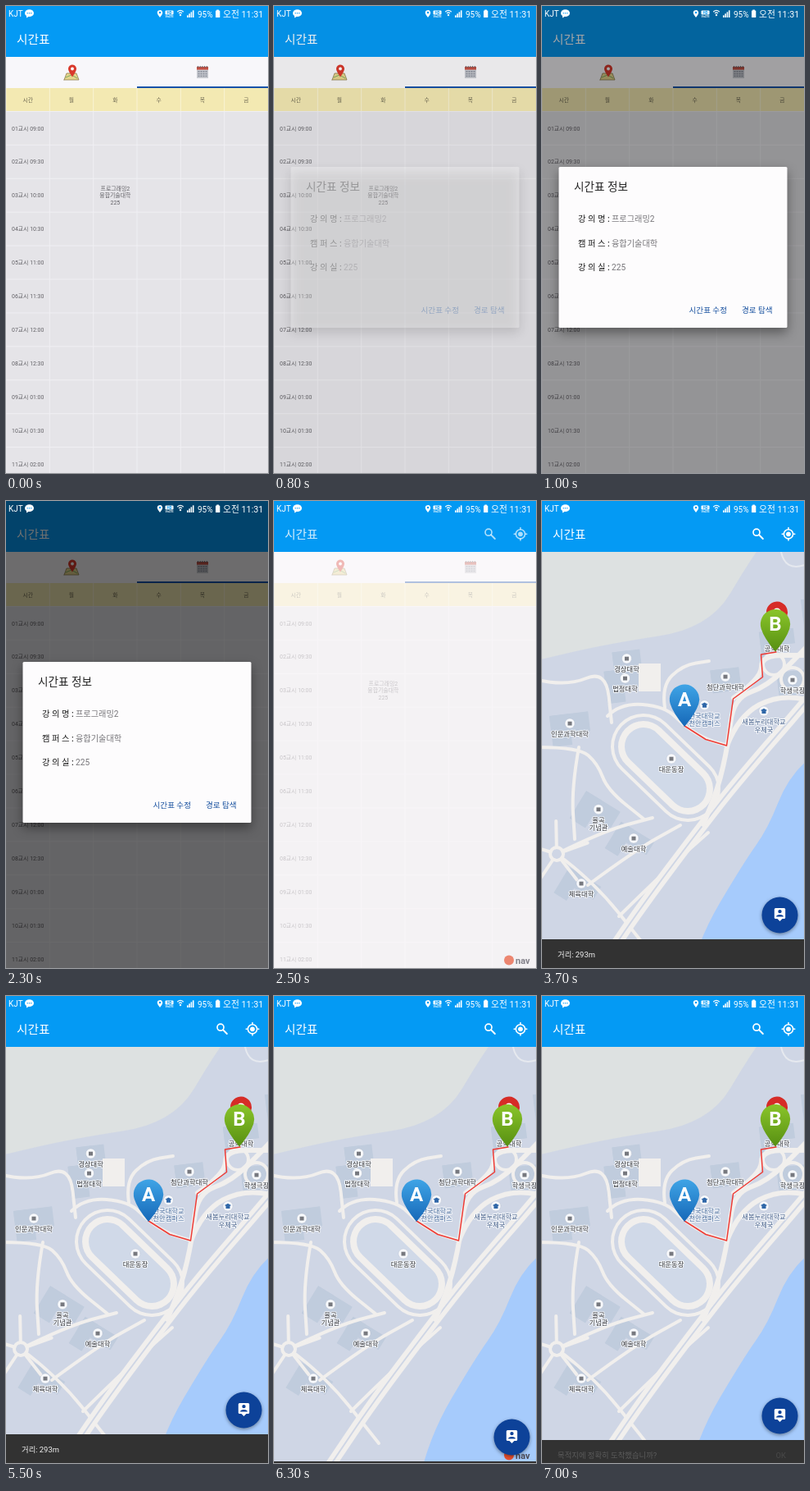
An HTML page with a canvas that plays this animation: 320 px wide and 569 px high, repeating every 7100 ms.

```html
<!DOCTYPE html>
<html lang="ko">
<head>
<meta charset="utf-8">
<title>시간표</title>
<style>
html, body { margin: 0; width: 100%; height: 100%; overflow: hidden; background: #fff; }
canvas { display: block; width: 100%; height: 100%; }
</style>
</head>
<body>
<canvas id="stage"></canvas>
<script>
const W = 320, H = 569, LOOP = 7100, STEP = 100, BAR = 62;
const FONT = 'Roboto, "Noto Sans CJK KR", "Noto Sans CJK", sans-serif';
const BLUE = '#049af4', ACCENT = '#0d4299', WHITE = '#fff', INK = '#37383d';
const LAND = '#cfd6e5', ROAD = '#f1efed', BLOCK = '#c0ccdd';
const dpr = Math.max(1, window.devicePixelRatio || 1);

// ---- helpers ----
function sheet(canvas, w, h) {
  canvas.width = w * dpr;
  canvas.height = h * dpr;
  const ctx = canvas.getContext('2d');
  ctx.scale(dpr, dpr);
  return ctx;
}

let c = sheet(document.getElementById('stage'), W, H);

function rect(x, y, w, h, fill) { c.fillStyle = fill; c.fillRect(x, y, w, h); }

function round(x, y, w, h, r, fill) {
  c.beginPath(); c.roundRect(x, y, w, h, r);
  c.fillStyle = fill; c.fill();
}

function disc(x, y, r, fill) {
  c.beginPath(); c.arc(x, y, r, 0, 7);
  c.fillStyle = fill; c.fill();
}

function ring(x, y, r, color, width) {
  c.beginPath(); c.arc(x, y, r, 0, 7);
  c.strokeStyle = color; c.lineWidth = width; c.stroke();
}

// y is the middle of the line of text
function text(s, x, y, size, color, align = 'left', weight = 400, halo) {
  c.font = `${weight} ${size}px ${FONT}`;
  c.textAlign = align;
  const base = y + size * 0.37;
  if (halo) {
    c.strokeStyle = halo; c.lineWidth = 2; c.lineJoin = 'round';
    c.strokeText(s, x, base);
  }
  c.fillStyle = color;
  c.fillText(s, x, base);
}

// rounds the corners of a list of points
function trace(p, smooth) {
  c.beginPath();
  c.moveTo(p[0], p[1]);
  for (let i = 2; i < p.length; i += 2) {
    if (smooth && i < p.length - 2)
      c.quadraticCurveTo(p[i], p[i + 1], (p[i] + p[i + 2]) / 2, (p[i + 1] + p[i + 3]) / 2);
    else c.lineTo(p[i], p[i + 1]);
  }
}

function area(p, fill, smooth) {
  trace(p, smooth); c.closePath();
  c.fillStyle = fill; c.fill();
}

function line(p, width, color, smooth) {
  trace(p, smooth);
  c.lineWidth = width; c.strokeStyle = color;
  c.lineCap = c.lineJoin = 'round';
  c.stroke();
}

function faded(alpha, draw) {
  if (alpha <= 0) return;
  c.save(); c.globalAlpha *= alpha; draw(); c.restore();
}

function shadowed(blur, drop, draw) {
  c.save();
  c.shadowColor = 'rgba(0,0,0,.4)';
  c.shadowBlur = blur * dpr;
  c.shadowOffsetY = drop * dpr;
  draw();
  c.restore();
}

const ramp = (t, from, span) => Math.min(1, Math.max(0, (t - from) / span));
const ease = (t, from, span) => { const u = ramp(t, from, span); return u * u * (3 - 2 * u); };

function random(seed) {
  return () => (seed = seed * 16807 % 2147483647) / 2147483647;
}

// ---- chrome ----
function statusBar() {
  text('KJT', 3, 9.5, 10, WHITE);
  c.beginPath(); c.ellipse(28.5, 8.7, 5.5, 4.4, 0, 0, 7); c.fillStyle = WHITE; c.fill();
  area([25, 11, 25, 14.5, 29, 12], WHITE);
  for (let i = 0; i < 3; i++) disc(26.2 + i * 2.3, 8.7, 0.7, BLUE);
  pinShape(188, 5, 3.2, 14, WHITE);
  disc(188, 8, 1.2, BLUE);
  round(194.5, 5.5, 10, 5, 1, WHITE);
  text('HD', 199.5, 8, 4.5, BLUE, 'center', 700);
  text('VoLTE', 199.5, 12.6, 3.6, WHITE, 'center', 700);
  for (const r of [2.5, 5]) {
    c.beginPath(); c.arc(213, 10.5, r, -2.3, -0.85);
    c.lineWidth = 1.2; c.strokeStyle = WHITE; c.stroke();
  }
  disc(213, 11, 1.2, WHITE);
  for (let i = 0; i < 4; i++) rect(221 + i * 2.3, 11.3 - i * 2, 1.6, 2.7 + i * 2, WHITE);
  text('95%', 234, 9.8, 10, WHITE);
  rect(257.3, 4.5, 2.6, 1.5, WHITE);
  round(256, 5.5, 5.3, 8.5, 0.6, WHITE);
  text('오전 11:31', 265, 9.8, 10.8, WHITE);
}

function appBar(icons) {
  rect(0, 0, W, BAR, BLUE);
  text('시간표', 13, 40.5, 14.7, WHITE);
  if (!icons) return;
  ring(262, 38.2, 4, WHITE, 1.7);
  line([265.2, 41.4, 269.8, 46], 2, WHITE);
  ring(301, 40.3, 5.6, WHITE, 1.6);
  disc(301, 40.3, 2.9, WHITE);
  for (let i = 0; i < 4; i++) {
    const x = Math.cos(i * Math.PI / 2), y = Math.sin(i * Math.PI / 2);
    line([301 + x * 6, 40.3 + y * 6, 301 + x * 7.8, 40.3 + y * 7.8], 1.5, WHITE);
  }
}

function pinShape(x, top, r, tip, fill) {
  const y = top + r;
  c.beginPath();
  c.arc(x, y, r, Math.PI * 0.9, Math.PI * 0.1);
  c.quadraticCurveTo(x + r * 0.75, y + r * 0.95, x, tip);
  c.quadraticCurveTo(x - r * 0.75, y + r * 0.95, x - r * 0.95, y + r * 0.31);
  c.fillStyle = fill; c.fill();
}

// ---- timetable ----
function tabs() {
  rect(0, BAR, W, 38, '#f8f7fa');
  const sheetEdge = [71, 90, 74, 82, 86, 82, 89, 90, 71, 90];
  area(sheetEdge, '#e6d58d');
  line(sheetEdge, 0.8, '#8d7d4d');
  line([73, 87, 80, 84, 87, 88], 1, '#7fae62');
  pinShape(81, 71.5, 5, 86.5, '#d9392c');
  disc(81, 76.5, 1.9, WHITE);
  rect(233, 74, 14, 14, '#c9cbd1');
  rect(233, 74, 14, 3.6, '#c84d3f');
  for (let i = 0; i < 5; i++) rect(234 + i * 2.7, 73, 1, 2.5, '#666a72');
  for (let i = 0; i < 12; i++)
    rect(234.5 + i % 4 * 3, 79 + Math.floor(i / 4) * 2.8, 2, 1.6, '#878c98');
  rect(160, 98, 160, 2, '#1752a8');
}

function timetable() {
  const col = W / 6, row = 40.9, top = 128.5, ink = '#626166';
  const two = n => String(n).padStart(2, '0');
  appBar(false);
  rect(0, BAR, W, H, '#e5e4e8');
  tabs();
  rect(0, 100, W, 28.5, '#f3e9b2');
  ['시간', '월', '화', '수', '목', '금'].forEach((s, i) => {
    text(s, col * (i + 0.5), 114.3, 6.8, '#6b6650', 'center');
    rect(col * i - 0.5, 100, 1, 28.5, '#faf4d4');
    rect(col * i - 0.5, top, 1, H, '#f0eff3');
  });
  for (let i = 0; i < 11; i++) {
    rect(0, top + i * row - 0.5, W, 1, '#f0eff3');
    const min = 540 + i * 30, hour = Math.floor(min / 60);
    const clock = two((hour - 1) % 12 + 1) + ':' + two(min % 60);
    text(`${two(i + 1)}교시 ${clock}`, col / 2, 149 + i * row, 6.9, ink, 'center');
  }
  ['프로그래밍2', '융합기술대학', '225'].forEach((s, i) =>
    text(s, col * 2.5, 222.3 + i * 8.4, 6.9, ink, 'center'));
}

function dialog() {
  shadowed(14, 6, () => round(20.5, 196, 279, 196, 1.5, '#fdfcfd'));
  text('시간표 정보', 39, 219.5, 13.6, '#222');
  [['강 의 명 :', '프로그래밍2'], ['캠 퍼 스 :', '융합기술대학'], ['강 의 실 :', '225']].forEach(([k, v], i) => {
    const y = 259.3 + i * 29.6;
    text(k, 44, y, 10.3, '#1c1c1c', 'left', 500);
    text(v, 85, y, 10.2, '#77767a');
  });
  text('시간표 수정', 179.5, 370.5, 9.6, '#17509f', 'left', 500);
  text('경로 탐색', 244, 370.5, 9.6, '#17509f', 'left', 500);
}

// ---- map ----
const PLACES = [
  ['경상대학', 103.5, 205], ['법정대학', 101.5, 229], ['인문과학대학', 34, 284],
  ['율곡|기념관', 69, 388.7], ['예술대학', 112, 424], ['체육대학', 48, 479],
  ['첨단과학대학', 224, 227], ['학생극장', 306, 231], ['공학대학', 287, 179.5],
  ['생명자원|과학대학', 340, 141.5]
];

function place(s, x, y, color = INK) {
  disc(x, y - 13, 6, 'rgba(250,251,253,.95)');
  ring(x, y - 13, 6, 'rgba(150,160,180,.35)', 0.6);
  if (color === INK) rect(x - 2.5, y - 15.3, 5, 4.8, '#77797f');
  else {
    area([x - 4, y - 14, x, y - 16.3, x + 4, y - 14, x, y - 11.8], '#2f67a8');
    rect(x - 2.5, y - 13, 5, 3, '#2f67a8');
  }
  s.split('|').forEach((part, i) =>
    text(part, x, y + i * 9.5, 8.3, color, 'center', 500, 'rgba(247,249,252,.9)'));
}

// an L-shaped block beside every named place
function buildings() {
  const rnd = random(41);
  for (const [, x, y] of PLACES) {
    const w = 34 + rnd() * 16, h = 16 + rnd() * 8;
    c.save();
    c.translate(x, y - 13);
    c.rotate(y > 340 ? 0.55 : -0.12);
    rect(-w / 2, -h / 2, w, h, BLOCK);
    rect(-w / 2, -h / 2, h, w * 0.8, BLOCK);
    c.restore();
  }
}

function campusLanes() {
  const lane = (...p) => line(p, 4, ROAD, true);
  // oblique grid south of the track
  for (let i = 0; i < 3; i++)
    lane(18 + i * 38, 430 + i * 38, 75 + i * 38, 402 + i * 24, 135 + i * 34, 386 + i * 9);
  lane(18, 430, 62, 462, 128, 545);
  for (let a = 0.3; a < 6; a += 1.25)
    lane(18, 430, 18 - 40 * Math.cos(a), 430 - 40 * Math.sin(a));
  disc(18, 430, 6, LAND);
  ring(18, 430, 8, ROAD, 4);
  // west and north edge
  lane(-5, 300, 45, 300, 68, 320, 80, 352, 125, 388);
  lane(45, 300, 36, 350, 40, 412);
  lane(-5, 218, 30, 226, 78, 206, 85, 270);
  lane(80, 262, 96, 246, 150, 250, 176, 276, 202, 291, 227, 298);
  lane(150, 252, 146, 225, 172, 200, 204, 195);
  rect(118, 198, 27, 34, ROAD);
}

function track() {
  const lap = [124, 299, 178, 351];
  [[80, ROAD], [72, LAND], [62, ROAD], [46, '#d0d9e8']].forEach(([w, fill]) => line(lap, w, fill));
}

function streets() {
  const avenue = [450, 92, 330, 236, 241, 338, 193, 399, 120, 496, 70, 570];
  line(avenue, 13, ROAD, true);
  line(avenue, 2, LAND, true);
  const street = (...p) => line(p, 6, ROAD, true);
  street(450, 42, 370, 126, 318, 184, 275, 226, 234, 240, 227, 298, 215, 350, 197, 394);
  street(226, 298, 240, 262, 290, 235, 352, 248, 420, 244);
  street(234, 240, 268, 216, 268, 188, 320, 188);
  for (const [x, y, r] of [[283, 199, 13], [306, 217, 14]]) ring(x, y, r, ROAD, 4);
  line([292, 62, 297, 85, 341, 72, 369, 64, 367, 22], 2, '#e6e9ef', true);
}

function terrain() {
  rect(-10, -110, 460, 760, LAND);
  area([-10, -110, 330, -110, 300, 10, 255, 70, 205, 155, 80, 174, -10, 195], '#dde1e1', true);
  area([330, -110, 390, 0, 262, 60, 300, -10], '#d6dce3', true);
  area([450, 267, 350, 264, 320, 278, 342, 299, 300, 338, 276, 399, 246, 441, 188, 539, 165, 650, 450, 650], '#a6cbfc', true);
  area([450, 300, 389, 392, 398, 421, 450, 450], LAND);
  buildings();
  campusLanes();
  track();
  streets();
  PLACES.forEach(p => place(...p));
  place('대운동장', 158, 327);
  place('단국대학교|천안캠퍼스', 198.5, 261.7, '#466a9b');
  place('새봄누리대학교|우체국', 271, 269, '#46608a');
}

// the map is drawn once and then only moved
const mapCanvas = document.createElement('canvas');
const MX = 10, MY = 110, MW = 460, MH = 760;
function buildMap() {
  const keep = c;
  c = sheet(mapCanvas, MW, MH);
  c.translate(MX, MY);
  terrain();
  c = keep;
}

function letterPin(s, x, top, light, dark) {
  const g = c.createLinearGradient(0, top, 0, top + 51.5);
  g.addColorStop(0, light); g.addColorStop(1, dark);
  pinShape(x, top, 18.2, top + 51.5, g);
  text(s, x, top + 17.4, 24, WHITE, 'center', 700);
}

function fab(y) {
  const x = 290.5;
  shadowed(4, 1.5, () => disc(x, y, 22, ACCENT));
  round(x - 6.7, y - 8.5, 13.4, 13, 1.5, WHITE);
  area([x - 3.5, y + 4, x + 3.5, y + 4, x, y + 7.5], WHITE);
  disc(x, y - 4.4, 2.2, ACCENT);
  c.beginPath(); c.ellipse(x, y + 2, 4.4, 2.5, 0, Math.PI, 0);
  c.fillStyle = ACCENT; c.fill();
}

function snackbar(y, alpha, message, action) {
  rect(0, y, W, 36, '#323232');
  faded(alpha, () => {
    text(message, 19, y + 18.5, 9.4, '#f2f2f2');
    if (action) text(action, 298, y + 18.5, 9.4, '#8a8a8a', 'right', 500);
  });
}

function mapPage(t) {
  const routed = t >= 3100;
  rect(0, BAR, W, H, '#fcf9fb');
  c.save();
  c.beginPath();
  c.rect(0, BAR, t < 3000 ? 290.5 : W, H);
  c.clip();
  if (!routed) c.translate(-127, 147.5);
  faded(ramp(t, 2600, 200), () => c.drawImage(mapCanvas, -MX, -MY, MW, MH));
  if (routed) line([174, 274, 200, 290.5, 225.5, 298, 233.5, 241, 269.5, 214.5, 267.5, 187, 286, 184], 1.5, '#ee3a34');
  if (t >= 2800) {
    pinShape(287, 122.5, 13, 165, '#d62c27');
    disc(287, 135.5, 5, WHITE);
  }
  if (routed) {
    letterPin('A', 174, 223.5, '#3fa4e6', '#1668b8');
    letterPin('B', 285, 132, '#8ac52a', '#578f12');
  }
  c.restore();
  disc(287, 559.5, 6, '#e8502f');
  text('nav', 295, 559.5, 11, '#4b4a55', 'left', 700);
  appBar(true);
  if (!routed) return;

  const first = ease(t, 3000, 300) * (1 - ease(t, 6000, 350));
  const second = ease(t, 6750, 350);
  const y = H - Math.round(35 * (first + second));
  fab(y - 29.5);
  if (second) snackbar(y, ramp(t, 6950, 230), '목적지에 정확히 도착했습니까?', 'OK');
  else snackbar(y, ramp(t, 3100, 200) * (1 - ramp(t, 6000, 200)), '거리: 293m');
}

// ---- timeline ----
function draw(t) {
  const page = ramp(t, 2300, 300);
  if (page < 1) {
    const leave = 1 - ramp(t, 2300, 200);
    timetable();
    rect(0, 0, W, H, `rgba(0,0,0,${0.56 * ramp(t, 700, 400) ** 1.6 * leave})`);
    faded(ramp(t, 700, 300) * leave, dialog);
  }
  faded(page, () => mapPage(t));
  statusBar();
}

const start = performance.now();
function tick() {
  draw(Math.floor((performance.now() - start) % LOOP / STEP) * STEP);
  requestAnimationFrame(tick);
}

buildMap();
tick();
</script>
</body>
</html>
```
